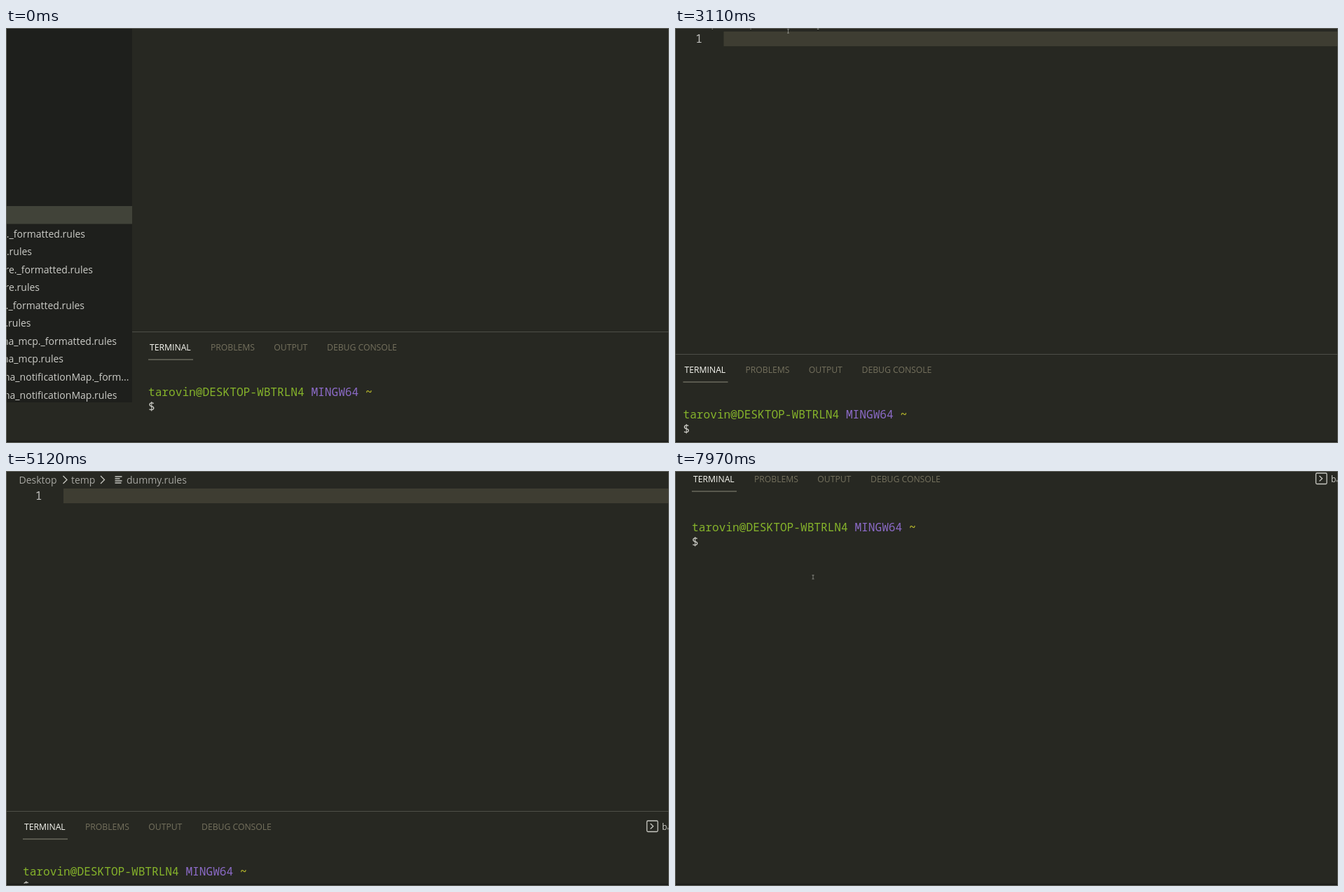
These frames come from a looping animation (946 by 592 pixels, 8000 ms). An HTML page:

```html
<!DOCTYPE html>
<html lang="en">
<head>
<meta charset="utf-8">
<title>Editor and terminal</title>
<style>
html, body { margin: 0; width: 100%; height: 100%; overflow: hidden; background: #272822; }
svg { display: block; width: 946px; height: 592px; font: 14px "Open Sans", "Noto Sans", sans-serif; }
text { white-space: pre; }
.mono { font: 16.15px "Noto Sans Mono", monospace; }
.tab { font-size: 12.2px; fill: #75715e; }
.line { fill: none; stroke: #c8c8c2; stroke-width: 1.3; }
</style>
</head>
<body>
<svg viewBox="0 0 946 592">
  <defs>
    <path id="list" class="line" d="M0 0H10M0 3H7M0 6H10M0 9H9"/>
    <path id="sep" class="line" d="M0 0L5.5 5.5L0 11"/>
  </defs>
  <!-- Origin: top left corner of the terminal panel -->
  <g id="world">
    <g id="sidebar" fill="#ccccc7" text-anchor="end">
      <path fill="#1e1f1c" d="M-400 -600H0V101H-400Z"/>
      <path fill="#414339" d="M-400 -179H0V-153.5H-400Z"/>
    </g>

    <path fill="#1e1f1c" d="M0 -527H1400V-486H0Z"/>
    <path fill="#34352f" d="M0 -527H138V-486H0ZM296 -527H434V-486H296Z"/>
    <path fill="#272822" d="M139 -527H295V-486H139Z"/>
    <use href="#list" x="20" y="-509.5"/>
    <text x="36.5" y="-500" fill="#bebeba">Untitled-1</text>
    <use href="#list" x="159.5" y="-509.5"/>
    <text x="176" y="-500" fill="#fff">dummy.rules</text>
    <circle cx="278" cy="-505.5" r="5" fill="#f8f8f2"/>
    <path fill="#cbcb41" d="M314 -510H324V-500H314Z"/>
    <text x="332.5" y="-500" fill="#bebeba">as.js</text>

    <g fill="#a5a5a0">
      <text x="17.5" y="-467">Desktop</text>
      <use href="#sep" x="80.5" y="-478"/>
      <text x="92" y="-467">temp</text>
      <use href="#sep" x="134" y="-478"/>
      <use href="#list" x="154.5" y="-477"/>
      <text x="171" y="-467">dummy.rules</text>
    </g>

    <path fill="#3e3d32" d="M81 -460H1400V-439H81Z"/>
    <text class="mono" x="45.5" y="-444" text-anchor="middle" fill="#c2c2bf">1</text>

    <path fill="#4d4e47" d="M0 0H1400V1H0Z"/>
    <text class="tab" x="25" y="27" style="fill:#f8f8f2">TERMINAL</text>
    <path fill="#8b897a" d="M23 39.5H87V40.5H23Z"/>
    <text class="tab" x="112" y="27">PROBLEMS</text>
    <text class="tab" x="202.3" y="27">OUTPUT</text>
    <text class="tab" x="278" y="27">DEBUG CONSOLE</text>
    <g id="prompt" class="mono">
      <text x="23" y="92" fill="#86b42b">tarovin@DESKTOP-WBTRLN4 <tspan fill="#8c6bc8">MINGW64</tspan> <tspan fill="#b3b42b" font-weight="600">~</tspan></text>
      <text x="23" y="113" fill="#d0d0ca">$</text>
    </g>

    <g id="actions">
      <rect class="line" x="913.5" y="14" width="15.5" height="15.5" rx="1.5"/>
      <path class="line" d="M918.5 18L922.5 21.8L918.5 25.5M974.5 21.5H989.5M982 14V29M997.5 20L1001.5 24L1005.5 20"/>
      <rect class="line" x="1021.5" y="14" width="15" height="14.5"/>
      <text x="935" y="27" font-size="12.1" fill="#ccccc7">bash</text>
    </g>
  </g>

  <path id="beam" fill="none" stroke="#a5a5a0" stroke-width=".7" d="M-1.5 -2.7H1.5M0 -2.7V2.7M-1.5 2.7H1.5"/>
  <path id="hand" fill="#fff" d="M-2 -4H-.8V-1.4L3 -.5V2L2 4H-1L-3.3 1V0H-2Z"/>

  <path fill="#1e1f1c" d="M0 588.5H946V592H0Z"/>
  <rect x=".5" y=".5" width="945" height="591" fill="none" stroke="#62635e"/>
</svg>
<script>
const $ = id => document.getElementById(id);
const LOOP = 8000;

// Clipped file names with their right edges
[["s._formatted.rules", 113], ["s.rules", 37], ["re._formatted.rules", 124], ["re.rules", 48],
 ["e._formatted.rules", 112], ["e.rules", 35.5], ["na_mcp._formatted.rules", 158], ["na_mcp.rules", 82],
 ["na_notificationMap._form...", 175.5], ["na_notificationMap.rules", 158.5]
].forEach(([name, right], i) => {
  const label = document.createElementNS("http://www.w3.org/2000/svg", "text");
  label.setAttribute("x", right - 180);
  label.setAttribute("y", -134.5 + i * 25.56);
  label.textContent = name;
  $("sidebar").append(label);
});

// Time, panel x, panel y, shift of the prompt in the panel
const views = [
  [0, 180, 433], [810, -112, 433], [1730, -112, 444], [1870, -112, 447],
  [2610, -11.5, 463], [2750, -11.5, 465], [3760, -46, 458], [3890, -80.5, 452],
  [4120, -30, 455.5], [4300, -8, 455.5], [4740, 0, 456], [4940, 1, 468],
  [5120, 1, 485], [5300, 1, 502], [5480, 1, 519], [5640, 1, 518],
  [5950, 1, 517], [7840, 1, 250, 5], [7970, 1, -11, 5]
];

// Time, then pointer shape and place; time alone hides it
const pointers = [
  [0], [2050, "beam", 312, 21], [2210], [3110, "beam", 161.5, 4.5], [3610],
  [6140, "beam", 637, 127.5], [6290, "beam", 760, 300], [6412, "beam", 905, 540],
  [6534, "beam", 700, 470], [6655, "beam", 420, 330], [6777, "beam", 240, 230],
  [6899, "beam", 161, 170], [7020], [7170, "hand", 185.5, 159],
  [7320, "hand", 188, 157], [7440, "hand", 196.5, 154], [7570, "hand", 198, 153.5],
  [7690, "beam", 197, 151.3]
];

const at = (steps, t) => steps.findLast(step => step[0] <= t);
const move = (id, x, y) => $(id).setAttribute("transform", `translate(${x} ${y})`);
const show = (id, on) => $(id).style.display = on ? "" : "none";

let start;
function draw(now) {
  start ??= now;
  const t = (now - start) % LOOP;
  const [, left, top, shift = 0] = at(views, t);
  move("world", left, top);
  move("prompt", 0, shift);
  show("actions", t >= 3760);

  const [, shape, x, y] = at(pointers, t);
  for (const id of ["beam", "hand"]) show(id, id === shape);
  if (shape) move(shape, x, y);
  requestAnimationFrame(draw);
}
requestAnimationFrame(draw);
</script>
</body>
</html>
```
